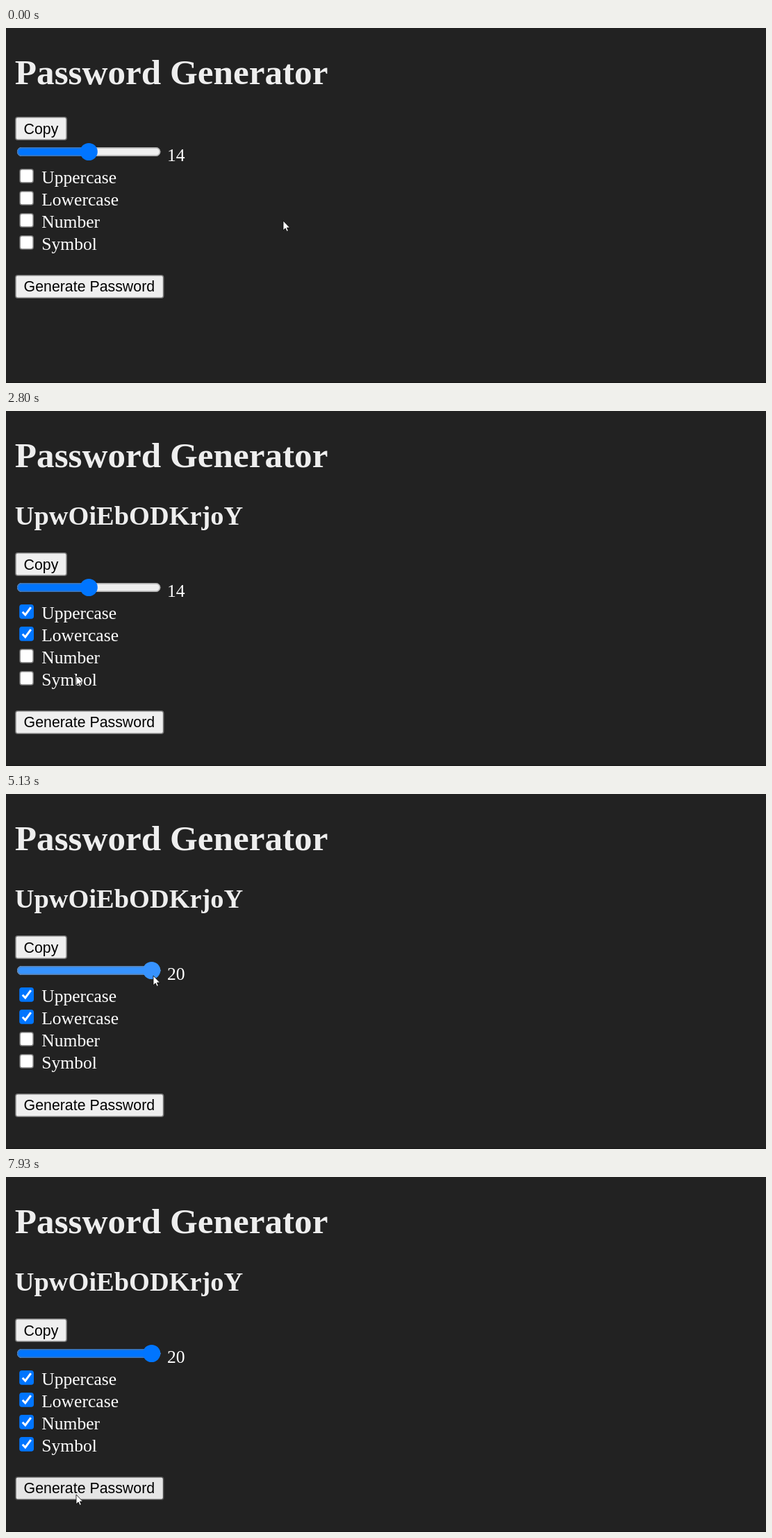
Recreate the animation shown at these times as an HTML page. Size 1094 px wide and 512 px high, loop 8 s.

```html
<!DOCTYPE html>
<html lang="en">
<head>
<meta charset="utf-8">
<title>Password Generator</title>
<style>
  html, body { margin: 0; width: 100%; height: 100%; overflow: hidden; background: #222; }
  svg { display: block; width: 1094px; height: 512px; }
  text { font: 25.6px "Liberation Serif", "Times New Roman", serif; fill: #fff; }
  .h1, .h2 { font-weight: bold; fill: #eee; }
  .h1 { font-size: 51.2px; }
  .h2 { font-size: 38.4px; }
  .btn text { font: 21.333px "Liberation Sans", Arial, sans-serif; fill: #000; }
  .btn rect { fill: #efefef; stroke: #767676; stroke-width: 1.6; }
  .box { stroke-width: 1.6; }
  .tick { fill: none; stroke: #fff; stroke-width: 3; }
</style>
</head>
<body>
<svg viewBox="0 0 1094 512">
  <rect y="510.5" width="1094" height="1.5" fill="#1a1a1a"/>
  <text class="h1" x="12.8" y="80.5">Password Generator</text>
  <text class="h2" id="result" x="12.8" y="163.5">UpwOiEbODKrjoY</text>
  <g id="form">
    <g class="btn">
      <rect x="13.8" y="128.8" width="73.4" height="32.4" rx="3"/>
      <text x="25.6" y="152.5">Copy</text>
    </g>
    <rect x="16" y="172.1" width="206.4" height="12.8" rx="6.4" fill="#efefef"/>
    <rect id="filled" x="16" y="172.1" height="12.8" rx="6.4"/>
    <rect x="16.8" y="172.9" width="204.8" height="11.2" rx="5.6" fill="none" stroke="#767676" stroke-opacity=".5" stroke-width="1.6"/>
    <circle id="thumb" cy="178.5" r="12.6"/>
    <text id="count" x="232" y="192"></text>
    <g id="rows"></g>
    <g class="btn">
      <rect id="generate" x="13.8" y="356.8" width="212.8" height="32.4" rx="3"/>
      <text x="25.6" y="380">Generate Password</text>
    </g>
  </g>
  <path id="cursor" d="M0 0V13.8L3.2 10.9 5.2 15.4 7.4 14.4 5.4 10.1H9.6Z" fill="#fff" stroke="#000" stroke-width=".8"/>
</svg>
<script>
const LOOP = 8000, STEP = 1000 / 15, ROW = 32, SHIFT = 76;
const GENERATED = 42, GRAB = 61, RELEASE = 83;
const BLUE = "#0075ff", BLUE_OVER = "#005cc8", BLUE_DOWN = "#3793ff";
const GREY = "#767676", GREY_OVER = "#4f4f4f", GREY_DOWN = "#8d8d8d";

const $ = id => document.getElementById(id);
const set = (el, attrs) => { for (const a in attrs) el.setAttribute(a, attrs[a]); };
const ease = f => f < .5 ? 4 * f ** 3 : 1 - 4 * (1 - f) ** 3;

const home = { x: 399, y: 278 };
const moves = [
  { from: 0, to: 12, x: 85, y: 216, dip: 74 },
  { from: 15, to: 18, x: 85, y: 247 },
  { from: 26, to: 36, x: 101, y: 382 },
  { from: 50, to: 59, x: 114, y: 262 },
  { from: 66, to: 80, x: 216, y: 262 },
  { from: 84, to: 91, x: 90, y: 345 },
  { from: 99, to: 103, x: 89, y: 386 },
  { from: 110, to: 119, x: 101, y: 458 }
];

function pointer(k) {
  let { x, y } = home;
  for (const m of moves) {
    if (k <= m.from) break;
    const f = ease(Math.min(1, (k - m.from) / (m.to - m.from)));
    x += (m.x - x) * f;
    y += (m.y - y) * f + (m.dip || 0) * Math.sin(Math.PI * f);
  }
  return { x, y };
}

const options = [
  { label: "Uppercase", checked: 15 }, { label: "Lowercase", checked: 24 },
  { label: "Number", checked: 98 }, { label: "Symbol", checked: 108 }
];
options.forEach((o, i) => {
  $("rows").insertAdjacentHTML("beforeend", `<g transform="translate(0 ${ROW * i})">
    <rect class="box" x="20" y="203.8" width="19.2" height="19.2" rx="3"/>
    <path class="tick" d="M23.8 213.8L27.8 218 35.8 207.2"/>
    <text x="51.2" y="224">${o.label}</text></g>`);
  const [box, tick, text] = $("rows").lastElementChild.children;
  Object.assign(o, { box, tick, right: 51.2 + text.getComputedTextLength() });
});

const shiftAt = k => k >= GENERATED ? SHIFT : 0;

// hover trails the pointer by one step and clears until it moves over the new layout
function hovered(k) {
  if (k >= GENERATED && k <= moves[3].from) return "";
  const at = Math.max(0, k - 1), p = pointer(at), y = p.y - shiftAt(at);
  const inside = (l, t, r, b) => p.x >= l && p.x <= r && y >= t && y <= b;
  if (inside(16, 166, 222, 192)) return "slider";
  if (inside(13, 356, 228, 390)) return "generate";
  return options.find((o, i) => inside(19, 201 + ROW * i, o.right, 230 + ROW * i));
}

const pick = (down, over, colors) => colors[down ? 2 : over ? 1 : 0];

function draw(k) {
  const over = hovered(k), { x, y } = pointer(k);
  set($("cursor"), { transform: `translate(${x} ${y})` });
  set($("form"), { transform: `translate(0 ${shiftAt(k)})` });
  $("result").style.display = k >= GENERATED ? "" : "none";

  const held = k < GRAB ? 114 : pointer(Math.min(k, RELEASE)).x;
  const value = Math.min(20, Math.round(8 + 12 * (held - 23.6) / 180.8));
  const cx = 28.8 + 180.8 * (value - 8) / 12;
  const fill = pick(k >= GRAB && k < RELEASE, over === "slider", [BLUE, BLUE_OVER, BLUE_DOWN]);
  set($("thumb"), { cx, fill });
  set($("filled"), { width: value === 20 ? 206.4 : cx - 16, fill });
  $("count").textContent = value;

  for (const o of options) {
    const on = k >= o.checked;
    const tint = pick(k === o.checked - 1, over === o,
      on ? [BLUE, BLUE_OVER] : [GREY, GREY_OVER, GREY_DOWN]);
    set(o.box, { fill: on ? tint : "#fff", stroke: tint });
    o.tick.style.display = on ? "" : "none";
  }

  const down = k === GENERATED - 1, gen = $("generate").style;
  gen.fill = pick(down, over === "generate", ["#efefef", "#e5e5e5", "#f5f5f5"]);
  gen.stroke = pick(down, over === "generate", [GREY, GREY_OVER, GREY_DOWN]);
}

const start = performance.now();
function tick() {
  const t = (performance.now() - start) % LOOP;
  draw(Math.min(119, Math.floor((t + 4) / STEP)));
  requestAnimationFrame(tick);
}
tick();
</script>
</body>
</html>
```
